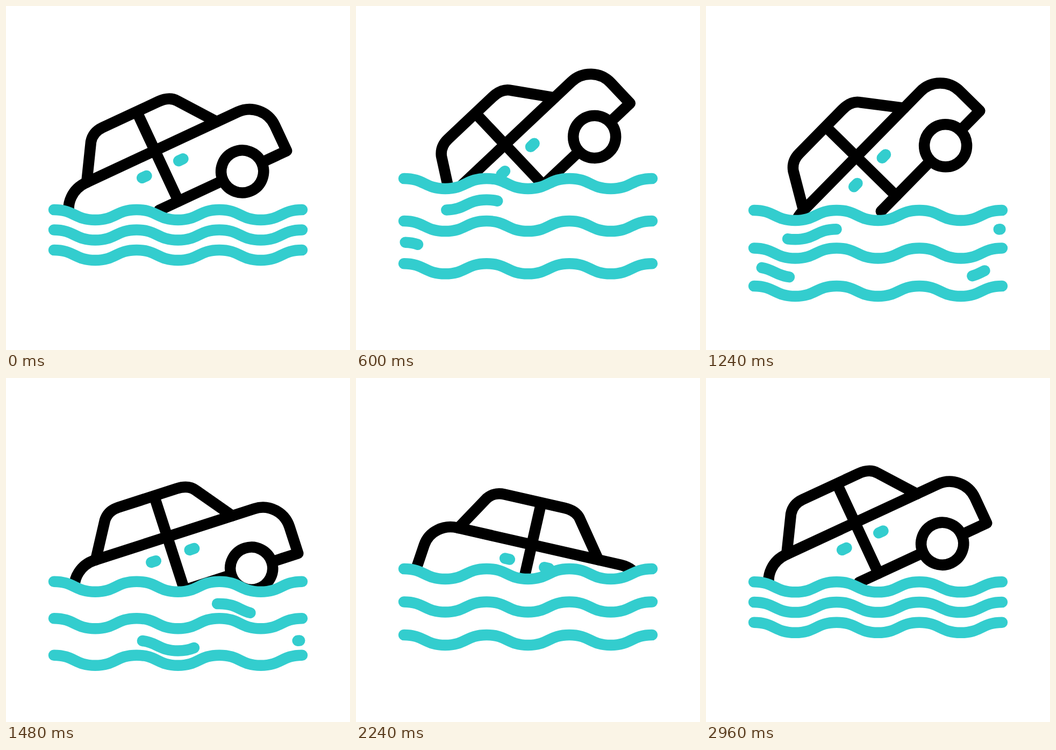
An HTML page that plays this animation: 640 px wide and 640 px high, repeating every 3 s.

```html
<!DOCTYPE html>
<html lang="en">
<head>
<meta charset="utf-8">
<title>Sinking car</title>
<style>
  html, body { margin: 0; width: 100%; height: 100%; overflow: hidden; background: #fff; }
  svg { display: block; width: 100vw; height: 100vh; }
  path, circle { fill: none; stroke-width: 20.5; stroke-linecap: round; stroke-linejoin: round; }
  .ink { stroke: #000; }
  .sea { stroke: #33cdce; }
</style>
</head>
<body>
<svg viewBox="0 0 640 640">
  <defs><clipPath id="air"><path id="airShape"/></clipPath></defs>
  <g clip-path="url(#air)">
    <!-- origin: where the door pillar crosses the belt line -->
    <g id="car">
      <g class="ink">
        <path d="M-201 104 L-195 45 C-192 18 -168 0 -142 0 H170 A52 52 0 0 1 222 52 V104 H171"/>
        <path d="M91 104 H-40"/>
        <path d="M-140 0 L-101 -65 C-93 -76 -83 -80 -70 -80 H44 C58 -80 70 -76 77 -66 L127 0"/>
        <path d="M0 -79 V104"/>
        <circle cx="131" cy="104" r="39.5"/>
      </g>
      <path class="sea" d="M-43 36 h9 M32 36 h9"/>
    </g>
  </g>
  <g id="water"></g>
</svg>
<script>
const LOOP = 3000, STEP = 40;
const $ = id => document.getElementById(id);

// time, car x, car y, car angle, middle wave y, gap between waves
const POSES = [
  [0,    277,   269,   -25,   416.5, 37.5],
  [320,  276.8, 258.2, -31,   405,   62],
  [560,  277,   257,   -42,   400,   79],
  [920,  277.5, 277.3, -51,   407,   80],
  [1120, 278.5, 279,   -50,   441,   75.5],
  [1240, 279.6, 280.4, -45.5, 450.5, 70.5],
  [1320, 285,   284,   -38,   453,   70],
  [1720, 320,   309,   7.3,   436.5, 66.5],
  [1920, 325.5, 310,   13,    445.5, 66],
  [2240, 327,   310,   12.8,  416.5, 61.5],
  [2500, 308,   294,   -3,    434,   57],
  [2800, 279,   271,   -23,   424,   42],
  [3000, 277,   269,   -25,   416.5, 37.5]
];

// row between waves, moment of half way, first moment seen
const RIPPLES = [[0, 660, 350], [1, 935, 520], [0, 1322, 890], [1, 1450, 1040]];

// monotone slope at pose i for column c
function slope(i, c) {
  if (i === 0 || i === POSES.length - 1) return 0;
  const [p, q, r] = [POSES[i - 1], POSES[i], POSES[i + 1]];
  const a = (q[c] - p[c]) / (q[0] - p[0]);
  const b = (r[c] - q[c]) / (r[0] - q[0]);
  return a * b <= 0 ? 0 : 2 * a * b / (a + b);
}

function poseAt(t) {
  let i = 0;
  while (i < POSES.length - 2 && POSES[i + 1][0] <= t) i++;
  const p = POSES[i], q = POSES[i + 1], d = q[0] - p[0], s = (t - p[0]) / d;
  const k = s * s * (3 - 2 * s);
  return [1, 2, 3, 4, 5].map(c =>
    p[c] + (q[c] - p[c]) * k +
    d * s * (1 - s) * ((1 - s) * slope(i, c) - s * slope(i + 1, c)));
}

function waveCurve() {
  let d = "";
  for (let n = 0; n < 6; n++) {
    const x = 89 + 77 * n, from = n % 2 ? 19 : 0, to = 19 - from;
    d += `C${x + 38.5} ${from} ${x + 38.5} ${to} ${x + 77} ${to}`;
  }
  return d;
}

const CURVE = waveCurve();

function addWave() {
  const p = document.createElementNS("http://www.w3.org/2000/svg", "path");
  p.setAttribute("class", "sea");
  p.setAttribute("d", "M89 0" + CURVE);
  p.setAttribute("pathLength", 1);
  return $("water").appendChild(p);
}

const waves = [-1, 0, 1].map(addWave);
const ripples = RIPPLES.map(addWave);
$("airShape").setAttribute("d", `M0 -640 V0 H89${CURVE}H640 V-640 Z`);

const moveY = (el, y) => el.setAttribute("transform", `translate(0 ${y})`);

function draw(t) {
  const [x, y, angle, mid, gap] = poseAt(t);
  $("car").setAttribute("transform", `translate(${x} ${y}) rotate(${angle})`);
  moveY($("airShape"), mid - gap);
  waves.forEach((w, i) => moveY(w, mid + (i - 1) * gap));

  const lag = 14 * Math.min(1, Math.max(0, (t - 1240) / 480));
  ripples.forEach((el, i) => {
    const [row, half, start] = RIPPLES[i];
    const head = 1 / (1 + Math.exp(-0.0085 * (t - half)));
    const tail = head ** 1.8;
    const seen = t >= start && t < 2200 && head < 0.9988;
    el.style.display = seen ? "" : "none";
    moveY(el, mid + (row - 0.5) * gap + lag);
    el.setAttribute("stroke-dasharray", `${head - tail} 3`);
    el.setAttribute("stroke-dashoffset", -tail);
  });
}

const begin = performance.now();
function tick() {
  const t = (performance.now() - begin) % LOOP;
  draw(Math.floor(t / STEP) * STEP);
  requestAnimationFrame(tick);
}
tick();
</script>
</body>
</html>
```
